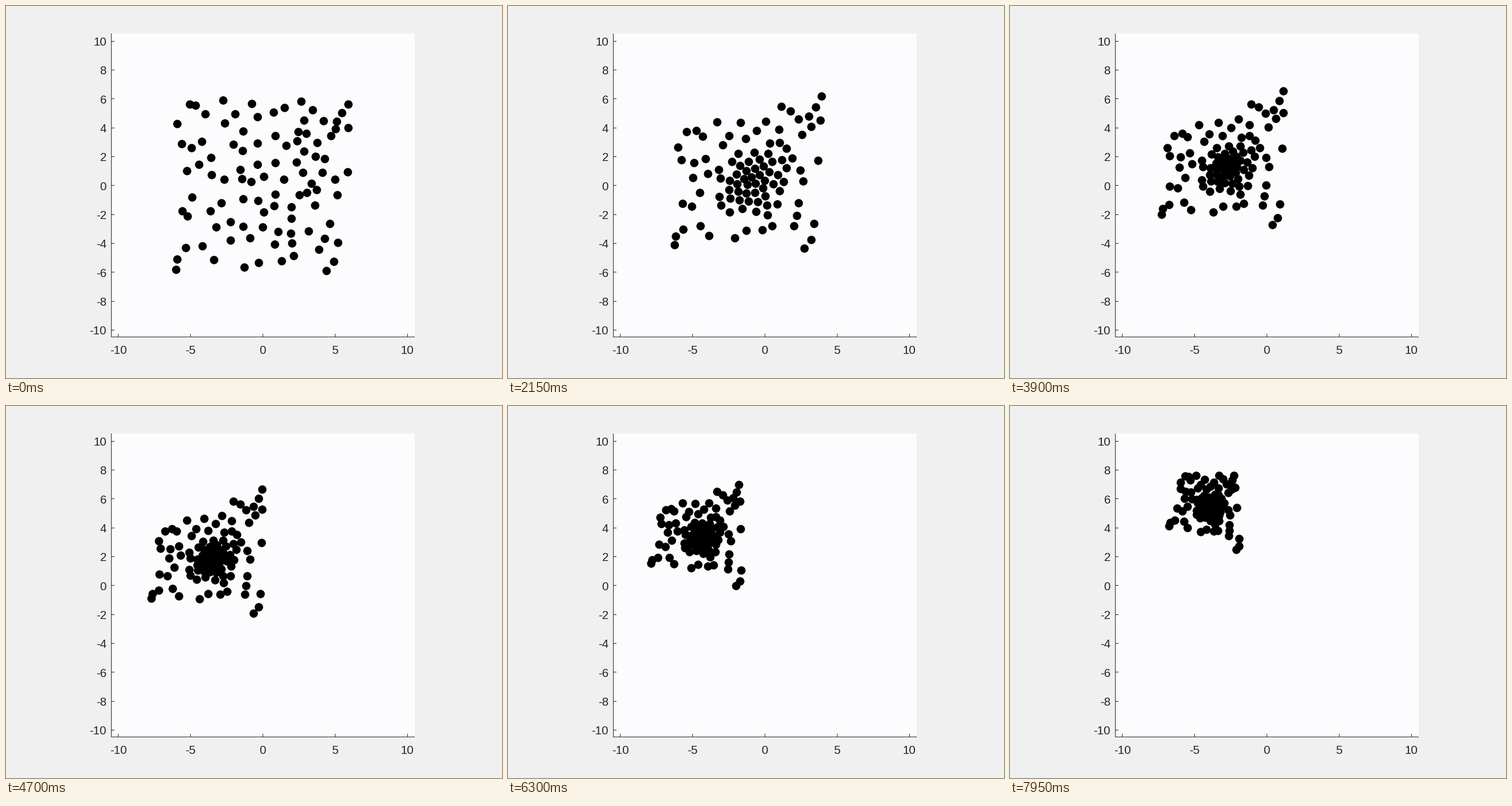
A matplotlib script for the animation above (8000 ms loop, 864 by 648 pixels).

```python
import numpy as np
import matplotlib.pyplot as plt
from matplotlib.animation import FuncAnimation
from matplotlib.patches import Rectangle

W, H = 864, 648
LOOP, STEP = 8000, 50
INK = "#262626"
UNIT = 25.17
CX, CY = 447.5, 312.8
COUNT = 98
SETTLE = 450  # ms for the dots to space themselves out

# A few dots on the rim, in axis units; the rest are scattered at random.
RIM = [(4.4, -5.9), (5.2, -3.95), (5.9, 5.65), (5.9, 4.0), (-5.95, 4.3), (-5.95, -5.1),
       (-6, -5.8), (-1.3, -5.65), (2.65, 5.85), (-2.75, 5.9), (5.85, 0.95), (-5.6, -1.75)]


def scatter():
    rng = np.random.default_rng(7)
    pts = np.array(RIM)
    while len(pts) < COUNT:
        # Of three candidates keep the loneliest.
        cand = rng.uniform(-5.7, 5.7, (3, 2))
        room = np.linalg.norm(cand[:, None] - pts, axis=-1).min(axis=1)
        pts = np.vstack([pts, cand[room.argmax()]])
    return np.c_[CX + UNIT * pts[:, 0], CY - UNIT * pts[:, 1]]


def gather(uv, power):
    """Draw dots inside the unit circle toward its middle."""
    r = np.linalg.norm(uv, axis=1, keepdims=True)
    return uv * np.clip(r, 0.05, 1) ** power


def spread(uv, gap=0.14, rounds=40):
    """Push crowded neighbours apart."""
    uv = uv.copy()
    for _ in range(rounds):
        diff = uv[:, None] - uv
        dist = np.linalg.norm(diff, axis=-1, keepdims=True) + 1e-9
        uv += 0.15 * (diff * np.clip(gap / dist - 1, 0, 2)).sum(axis=1)
    return uv


def middle(s):
    return np.array([391 + 57 * np.cos(np.pi * s / 0.83), 316 - 140 * s * s])


def size(s):
    return np.array([155 - 99 * s, 160 * np.exp(-s)])


START = (scatter() - middle(0)) / size(0)
LOOSE = spread(1.02 * gather(START, 0.75))


def swarm(t):
    s = t / LOOP
    uv = START + (LOOSE - START) * (1 - np.exp(-t / SETTLE))
    uv = gather(uv, 0.35 * s)
    u, v = uv.T
    # The far corner lags behind, which skews the shrinking swarm.
    skew = np.c_[12 * s * u * v,
                 28 * np.sin(2.7 * s) * u * v - 16 * np.sin(4 * s) * u]
    return middle(s) + size(s) * uv + skew


plt.rcParams["font.family"] = "Liberation Sans"
fig = plt.figure(figsize=(W / 72, H / 72), dpi=72, facecolor="#f0f0f0")
ax = fig.add_axes([0, 0, 1, 1])
ax.set_xlim(0, W)
ax.set_ylim(H, 0)
ax.axis("off")


def box(x, y, w, h, color):
    ax.add_patch(Rectangle((x, y), w, h, color=color, lw=0))


box(183, 48, 529, 529, "#fcfcfe")
box(183, 48, 1, 529, INK)
box(183, 576, 529, 1, INK)
for n in range(-10, 11, 2):
    y = CY - n * UNIT
    box(183, round(y - 0.5), 6, 1, INK)
    ax.text(175, y + 8, str(n), ha="right", va="baseline", size=20.5, color=INK)
for n in range(-10, 11, 5):
    x = CX + n * UNIT
    box(round(x - 0.5), 571, 1, 6, INK)
    ax.text(x, 606, str(n), ha="center", va="baseline", size=20.5, color=INK)

dots, = ax.plot([], [], "o", color="black", ms=14.6, mew=0)


def draw(i):
    dots.set_data(*swarm(i * STEP).T)
    return dots,


anim = FuncAnimation(fig, draw, frames=LOOP // STEP, interval=STEP,
                     blit=True, repeat=True, repeat_delay=0)
plt.show()
```
